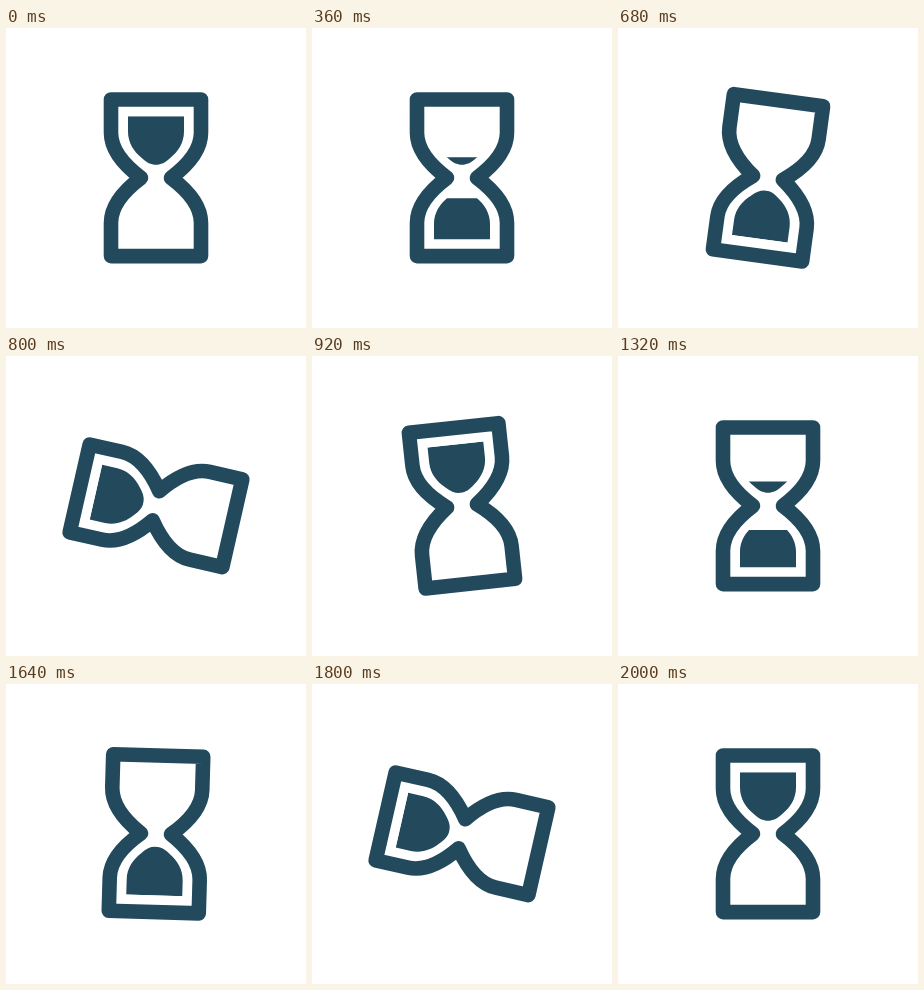
An HTML page that plays this animation: 300x300 px, repeating every 2.04 s.

```html
<!DOCTYPE html>
<html lang="en">
<head>
<meta charset="utf-8">
<title>Hourglass</title>
<style>
  html, body { margin: 0; width: 100%; height: 100%; overflow: hidden; background: #fff; }
  svg { display: block; width: 100vw; height: 100vh; }
</style>
</head>
<body>
<svg viewBox="0 0 300 300">
  <defs>
    <path id="sand" d="M-28 -61.6H28V-46C28 -35 22 -26 14.5 -20C9 -15 5 -13 0 -13C-5 -13 -9 -15 -14.5 -20C-22 -26 -28 -35 -28 -46Z"/>
    <clipPath id="upperClip"><rect id="upperLevel" x="-40" width="80"/></clipPath>
    <clipPath id="lowerClip"><rect id="lowerLevel" x="-40" width="80"/></clipPath>
  </defs>
  <g id="glass" fill="#23495c">
    <path fill="none" stroke="#23495c" stroke-width="14.6" stroke-linejoin="round"
      d="M-15 0C-31 -12 -45 -27 -45 -45V-78.3H45V-45C45 -27 31 -12 15 0C31 12 45 27 45 45V78.3H-45V45C-45 27 -31 12 -15 0Z"/>
    <g clip-path="url(#upperClip)"><use href="#sand"/></g>
    <g clip-path="url(#lowerClip)"><use href="#sand" transform="scale(1 -1)"/></g>
  </g>
</svg>
<script>
const LOOP = 2040, CYCLE = 1000, POUR = 600, STEP = 40;
const SAND_EDGE = 61.6, SAND_HEIGHT = 49;
const byId = id => document.getElementById(id);
const glass = byId('glass'), upper = byId('upperLevel'), lower = byId('lowerLevel');

// Cubic easing with handles (x1, 0) and (x2, 1), solved by bisection.
function ease(x1, x2) {
  return u => {
    if (u <= 0 || u >= 1) return Math.min(1, Math.max(0, u));
    let lo = 0, hi = 1;
    for (let i = 0; i < 30; i++) {
      const s = (lo + hi) / 2, r = 1 - s;
      if (3 * x1 * s * r * r + 3 * x2 * s * s * r + s * s * s < u) lo = s;
      else hi = s;
    }
    return lo * lo * (3 - 2 * lo);
  };
}
const pour = ease(0.35, 0.32), turn = ease(0.65, 0.288);

function setSpan(rect, top, height) {
  rect.setAttribute('y', top);
  rect.setAttribute('height', height);
}

function draw(time) {
  const tick = Math.floor((time % LOOP) / STEP) * STEP;
  const phase = tick % CYCLE;
  const fallen = pour(phase / POUR) * SAND_HEIGHT;
  const angle = 180 * turn((phase - POUR) / (CYCLE - POUR));
  setSpan(upper, -SAND_EDGE + fallen, SAND_HEIGHT - fallen);
  setSpan(lower, SAND_EDGE - fallen, fallen);
  glass.setAttribute('transform', `translate(150 149.8) rotate(${angle})`);
}

function loop() {
  draw(performance.now());
  requestAnimationFrame(loop);
}
loop();
</script>
</body>
</html>
```
